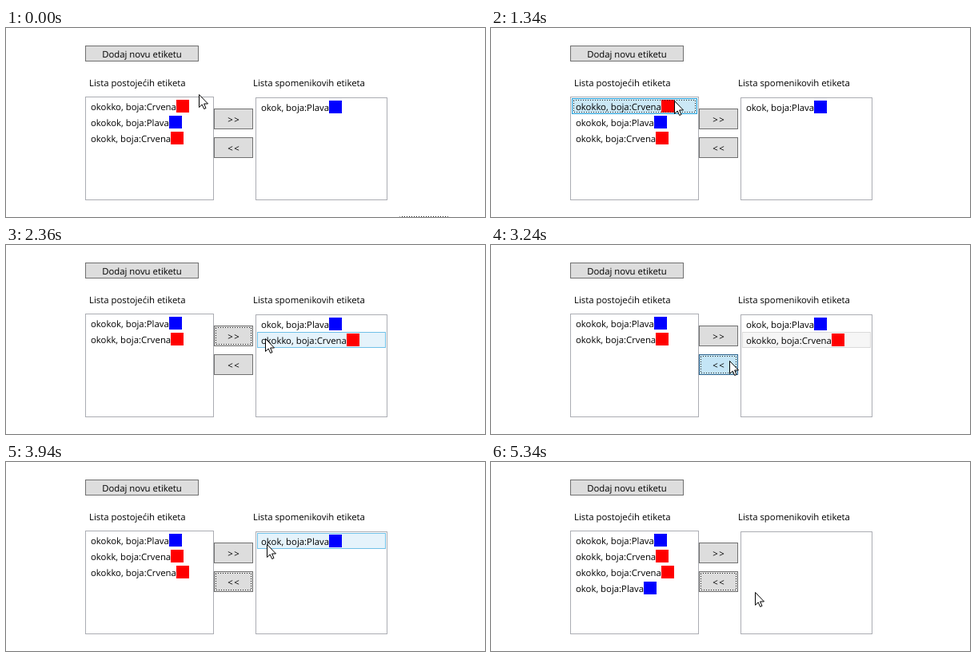
Recreate the animation shown at these times as an HTML page. Size 599 by 237 pixels, loop 5.89 s.

```html
<!DOCTYPE html>
<html lang="hr">
<head>
<meta charset="utf-8">
<style>
  html, body { margin: 0; width: 100%; height: 100%; overflow: hidden; background: #fff; }
  svg { display: block; }
  text { font: 11.35px "Open Sans", "Noto Sans", sans-serif; text-rendering: geometricPrecision; }
  .mid { text-anchor: middle; }
  .sign { letter-spacing: 1.4px; }
  .dots { fill: none; stroke: #222; stroke-dasharray: 1 2; stroke-dashoffset: .5; }
</style>
</head>
<body>
<svg width="599" height="237" viewBox="0 0 599 237">
  <g id="view"></g>
  <path id="arrow" d="M.5 .5V16.5L4.2 13L6.7 18.5L9 17.5L6.6 12H11.5Z" fill="#fff" stroke="#000"/>
</svg>
<script>
const LOOP = 5890;
const STEP = 78; // time between pointer positions
const view = document.getElementById('view');
const arrow = document.getElementById('arrow');

const red = '#f00', blue = '#00f';
const items = {
  a: { label: 'okokko, boja:Crvena', width: 107, color: red },
  b: { label: 'okokok, boja:Plava', width: 98, color: blue },
  c: { label: 'okokk, boja:Crvena', width: 100, color: red },
  d: { label: 'okok, boja:Plava', width: 85, color: blue }
};

const lists = [
  { x: 99, y: 86, w: 161, h: 130 },
  { x: 312, y: 87, w: 165, h: 129 }
];

// fill and border
const skin = {
  plain: ['#ddd', '#707070'],
  buttonHover: ['#bee6fd', '#3c7fb1'],
  buttonDown: ['#c4e5f6', '#2c628b'],
  rowHover: ['#e5f3fb', '#70c0e7'],
  rowOn: ['#cbe8f6', '#26a0da'],
  rowIdle: ['#f6f6f6', '#dadada'],
  list: ['#fff', '#abadb3']
};

// a row is picked, then its list's button sends it to the other list
const rounds = [
  { pick: 650, press: 1730, release: 1810, list: 0, row: 0 },
  { pick: 2600, press: 3240, release: 3310, list: 1, row: 1 },
  { pick: 4030, press: 4640, release: 4730, list: 1, row: 0 }
];

const home = { x: 241, y: 83 };
const legs = [
  { from: 270, to: 420, x: 229, y: 91 },
  { from: 1420, to: 1650, x: 280, y: 117 },
  { from: 2210, to: 2360, x: 324, y: 117 },
  { from: 2760, to: 3070, x: 298, y: 145 },
  { from: 3560, to: 3940, x: 326, y: 103 },
  { from: 4180, to: 4490, x: 291, y: 148 },
  { from: 4870, to: 5020, x: 333, y: 160 },
  { from: 5340, to: 5340, x: 330, y: 163 }
];

function pointerAt(t) {
  let pos = home;
  for (const leg of legs) {
    if (t < leg.from) break;
    const gaps = Math.round((leg.to - leg.from) / STEP);
    const done = t >= leg.to ? gaps : Math.floor((t - leg.from) / (leg.to - leg.from) * gaps);
    const p = (done + 1) / (gaps + 1);
    const ease = p * p * (3 - 2 * p);
    pos = {
      x: Math.round(pos.x + (leg.x - pos.x) * ease),
      y: Math.round(pos.y + (leg.y - pos.y) * ease)
    };
    if (t < leg.to) break;
    pos = { x: leg.x, y: leg.y };
  }
  return pos;
}

function stateAt(t) {
  const state = { rows: [[...'abc'], ['d']], sel: null, focus: 'below', down: null };
  for (const { pick, press, release, list, row } of rounds) {
    if (t < pick) break;
    state.sel = { list, row };
    state.focus = 'row';
    if (t < press) break;
    state.focus = state.down = list;
    if (t < release) break;
    state.rows[1 - list].push(...state.rows[list].splice(row, 1));
    state.sel = state.down = null;
  }
  return state;
}

const box = (x, y, w, h, [fill, stroke]) =>
  `<rect x="${x + .5}" y="${y + .5}" width="${w - 1}" height="${h - 1}" fill="${fill}" stroke="${stroke}"/>`;
const dots = (x, y, w, h) =>
  `<rect class="dots" x="${x + 2.5}" y="${y + 2.5}" width="${w - 5}" height="${h - 5}"/>`;
const text = (x, y, s, cls = '') => `<text x="${x}" y="${y}" class="${cls}">${s}</text>`;
const inside = (p, x, y, w, h) => p.x >= x && p.x < x + w && p.y >= y && p.y < y + h;

function drawList(n, state, p) {
  const { x: left, y: top, w, h } = lists[n];
  const x = left + 2, rowW = w - 4;
  let out = box(left, top, w, h, skin.list);
  state.rows[n].forEach((key, i) => {
    const y = top + 2 + 20 * i;
    const { label, width, color } = items[key];
    const on = state.sel && state.sel.list === n && state.sel.row === i;
    const live = on && state.focus === 'row';
    const look = live ? 'rowOn' : on ? 'rowIdle' : inside(p, x, y, rowW, 20) ? 'rowHover' : '';
    if (look) out += box(x, y, rowW, 20, skin[look]);
    out += text(x + 5, y + 15, label);
    out += `<rect x="${x + 5 + width}" y="${y + 2}" width="16" height="16" fill="${color}"/>`;
    if (live) out += dots(x, y, rowW, 20);
  });
  return out;
}

function drawButton(n, state, p) {
  const area = [260, 101 + 36 * n, 49, 26];
  const look = state.down === n ? 'buttonDown' : inside(p, ...area) ? 'buttonHover' : 'plain';
  return box(...area, skin[look]) +
    text(285.2, area[1] + 18, n ? '&lt;&lt;' : '&gt;&gt;', 'mid sign') +
    (state.focus === n ? dots(...area) : '');
}

function draw(state, p) {
  let out = box(99, 22, 142, 20, skin.plain) + text(170, 37, 'Dodaj novu etiketu', 'mid');
  out += text(104, 73, 'Lista postojećih etiketa') + text(309, 73, 'Lista spomenikovih etiketa');
  for (const n of [0, 1]) out += drawList(n, state, p) + drawButton(n, state, p);
  if (state.focus === 'below') out += dots(490, 234, 65, 30);
  view.innerHTML = out;
  arrow.setAttribute('transform', `translate(${p.x} ${p.y})`);
}

let shown = '';
const start = performance.now();

function tick() {
  const t = Math.max(0, performance.now() - start) % LOOP;
  const state = stateAt(t), p = pointerAt(t);
  const next = JSON.stringify([state, p]);
  if (next !== shown) draw(state, p);
  shown = next;
  requestAnimationFrame(tick);
}
tick();
</script>
</body>
</html>
```
